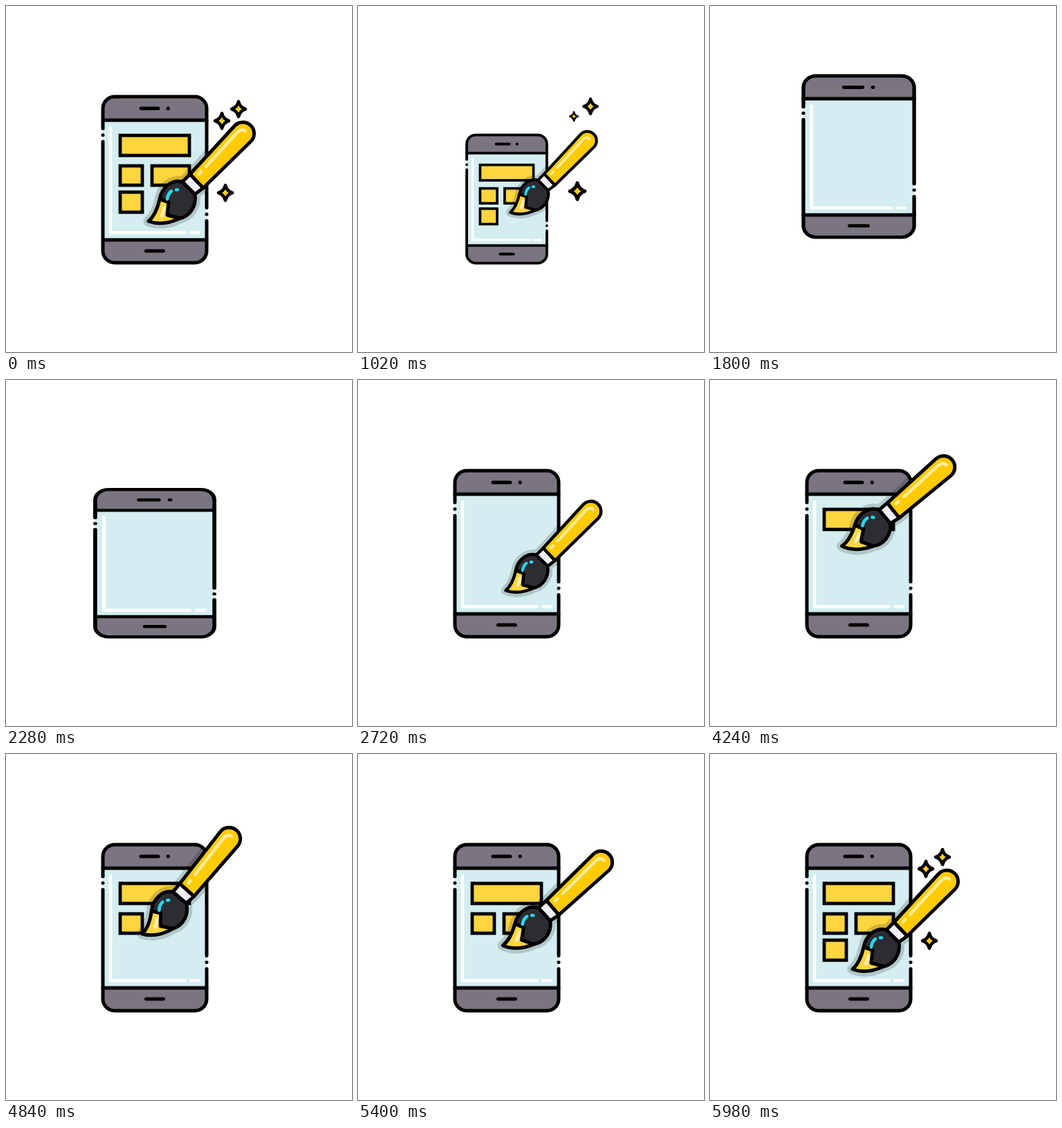
An HTML page that plays this animation: 500x500 px, repeating every 6 s.

```html
<!DOCTYPE html>
<html lang="en">
<head>
<meta charset="utf-8">
<title>Painting a phone layout</title>
<style>
html, body { margin: 0; width: 100%; height: 100%; overflow: hidden; background: #fff; }
svg { display: block; width: 100vw; height: 100vh; }
.line { fill: none; stroke: #000; stroke-width: 5; stroke-linecap: round; stroke-linejoin: round; }
.ink { stroke: #000; stroke-width: 5; stroke-linecap: round; stroke-linejoin: round; }
.shine { fill: none; stroke-width: 4.6; stroke-linecap: round; stroke-linejoin: round; }
</style>
</head>
<body>
<svg viewBox="0 0 500 500" xmlns="http://www.w3.org/2000/svg">
  <defs>
    <clipPath id="body"><rect id="bodyShape" x="140" y="131" width="150" height="240" rx="17"/></clipPath>
    <path id="outline" d="M206 311C214 304 219 293 222 279C225 262 240 250 255 254L266 243L330.5 173A16 16 0 0 1 354 195.5L285 263L273 272C276 290 265 304 251 307C238 314 222 317 206 311Z"/>
    <path id="starShape" d="M0-11Q2-2.5 10 0Q2 2.5 0 11Q-2 2.5-10 0Q-2-2.5 0-11Z" fill="#ffcf1f" stroke="#000" stroke-width="4.6" stroke-linejoin="round"/>
  </defs>

  <g id="phone">
    <rect x="140" y="131" width="150" height="240" rx="17" fill="#d4edf1"/>
    <path d="M140 165V148A17 17 0 0 1 157 131H273A17 17 0 0 1 290 148V165Z" fill="#7a7580"/>
    <path d="M140 338V354A17 17 0 0 0 157 371H273A17 17 0 0 0 290 354V338Z" fill="#7a7580"/>
    <path class="shine" stroke="#fff" stroke-width="5" d="M151 176V327.5H259M268 327.5H278"/>
    <g id="blocks"></g>
    <path class="line" d="M140 177V148A17 17 0 0 1 157 131H273A17 17 0 0 1 290 148V291.5M290 301V301.01M290 310.5V354A17 17 0 0 1 273 371H157A17 17 0 0 1 140 354V196M140 186.5V186.51"/>
    <path class="line" d="M140 165H290M140 338H290M195 148H220M234 148H234.5M202.5 354H227.5"/>
  </g>

  <g clip-path="url(#body)">
    <use id="shade" href="#outline" fill="#000" stroke="#000" stroke-width="15" stroke-linejoin="round" opacity=".16"/>
  </g>

  <g id="brush">
    <path class="ink" fill="#fcd53f" d="M222 279C219 293 214 304 206 311C222 317 238 313 251 307L236 284Z"/>
    <path class="shine" stroke="#fff0b4" d="M229 291Q228 298 225 303"/>
    <path class="ink" fill="#2d2c32" d="M222 279C225 262 240 250 255 254L273 272C276 290 265 304 251 307L233 302L235 283Z"/>
    <path class="ink" fill="#f3eff7" d="M255 254L266 243L285 263L273 272Z"/>
    <path class="ink" fill="#ffcb05" d="M266 243L330.5 173A16 16 0 0 1 354 195.5L285 263Z"/>
    <path class="shine" stroke="#ffeb9b" d="M289 232L333 184Q340 176 346 181M278.5 243L282 239.5"/>
    <path class="shine" stroke="#25d9f2" d="M233 279Q234 271 239 267.5M246 265.5L248 265.5"/>
  </g>
  <g id="stars"></g>
</svg>

<script>
const LOOP = 6000;
const NS = 'http://www.w3.org/2000/svg';
const el = id => document.getElementById(id);
const clamp = v => Math.max(0, Math.min(1, v));
const span = (t, a, b) => clamp((t - a) / (b - a));
const smooth = u => (1 - Math.cos(Math.PI * u)) / 2;
const backIn = u => 2.70158 * u ** 3 - 1.70158 * u * u;
const backOut = u => 1 - backIn(1 - u);
const elastic = u => u <= 0 ? 0 : u >= 1 ? 1
  : 1 + 2 ** (-10 * u) * Math.sin((10 * u - 0.75) * 2 * Math.PI / 3);

// x, y, width, height, paint start, paint end
const blocks = [
  [165, 187, 100, 29, 3520, 3940],
  [165, 231, 32, 28, 4640, 4840],
  [211, 231, 54, 28, 4970, 5220],
  [165, 269, 32, 29, 5600, 5820]
];

// x, y, shrink start, pop start
const stars = [
  [312, 166, 435, 5600],
  [336, 149, 565, 5670],
  [317, 270, 660, 5640]
];

// time, width scale, height scale, lift
const hop = [
  [1520, 0, 0, 0],
  [1700, 1.09, 0.85, 24],
  [1800, 1.067, 0.971, 37],
  [1890, 0.97, 1.04, 38],
  [2120, 0.95, 1.05, 0],
  [2220, 1.3, 0.74, 0],
  [2360, 0.92, 1.11, 0],
  [2500, 1.03, 0.97, 0],
  [2630, 1, 1, 0]
];

// time, tip x, tip y, turn
const strokes = [
  [2900, 206, 311, 0],
  [3420, 148, 203, 17.5],
  [3520, 149, 204, 17.5],
  [3960, 267, 222, -9],
  [4420, 153, 249, 12],
  [4640, 153, 250, 12],
  [4840, 197, 260, -4.7],
  [4970, 206, 250, 2],
  [5245, 273, 262, -8.5],
  [5540, 156, 289, 12],
  [5610, 156, 290, 12],
  [5840, 193, 303, 2],
  [5985, 206, 311, 0]
];

function pose(keys, t) {
  const next = keys.findIndex(k => k[0] > t);
  if (next === 0) return keys[0].slice(1);
  if (next < 0) return keys[keys.length - 1].slice(1);
  const a = keys[next - 1], b = keys[next];
  const u = smooth(span(t, a[0], b[0]));
  return a.slice(1).map((v, i) => v + (b[i + 1] - v) * u);
}

// swell a little, then collapse
function leave(t, peak, end) {
  if (t < peak) return 1 + 0.1 * smooth(t / peak);
  return 1.1 * (1 - span(t, peak, end) ** 3);
}

function add(parent, tag, attrs) {
  const node = document.createElementNS(NS, tag);
  for (const k in attrs) node.setAttribute(k, attrs[k]);
  return parent.appendChild(node);
}

const wipes = blocks.map(([x, y, width, height], i) => {
  const clip = add(document.querySelector('defs'), 'clipPath', { id: 'wipe' + i });
  const wipe = add(clip, 'rect', { x: x - 3, y: y - 3, width: 0, height: height + 6 });
  add(el('blocks'), 'rect', {
    x, y, width, height, fill: '#fcd53f', stroke: '#000', 'stroke-width': 4.8,
    'clip-path': `url(#wipe${i})`
  });
  return wipe;
});
const starNodes = stars.map(() => add(el('stars'), 'use', { href: '#starShape' }));

function place(node, transform, visible) {
  node.setAttribute('transform', transform);
  node.setAttribute('visibility', visible ? 'visible' : 'hidden');
}

function draw(t) {
  const leaving = t < 1400;

  let sx, sy, lift = 0;
  if (leaving) sx = sy = leave(t, 610, 1225);
  else [sx, sy, lift] = pose(hop, t);
  const body = `translate(215 ${373.5 - lift}) scale(${sx} ${sy}) translate(-215 -373.5)`;
  place(el('phone'), body, sx > 0.001);
  el('bodyShape').setAttribute('transform', body);

  const size = leaving ? leave(t, 630, 1245) : elastic(span(t, 2400, 3400));
  const [x, y, turn] = pose(strokes, t);
  const brush = `translate(${x - 206} ${y - 311}) rotate(${turn} 206 311) ` +
    `translate(283 241) scale(${size}) translate(-283 -241)`;
  place(el('brush'), brush, size > 0.001);
  place(el('shade'), brush, size > 0.001);

  blocks.forEach(([, , w, , start, end], i) => {
    const shown = leaving ? 1 : smooth(span(t, start, end));
    wipes[i].setAttribute('width', (w + 6) * shown);
  });

  stars.forEach(([cx, cy, shrink, pop], i) => {
    const u = span(t, shrink, shrink + 690);
    const s = t < 3000 ? 1 - backIn(u) : backOut(span(t, pop, pop + 310));
    const rise = t < 3000 ? 9 * u * u : 0;
    place(starNodes[i], `translate(${cx} ${cy - rise}) scale(${s})`, s > 0.001);
  });
}

const begin = performance.now();
function tick() {
  draw((performance.now() - begin) % LOOP);
  requestAnimationFrame(tick);
}
draw(0);
requestAnimationFrame(tick);
</script>
</body>
</html>
```
